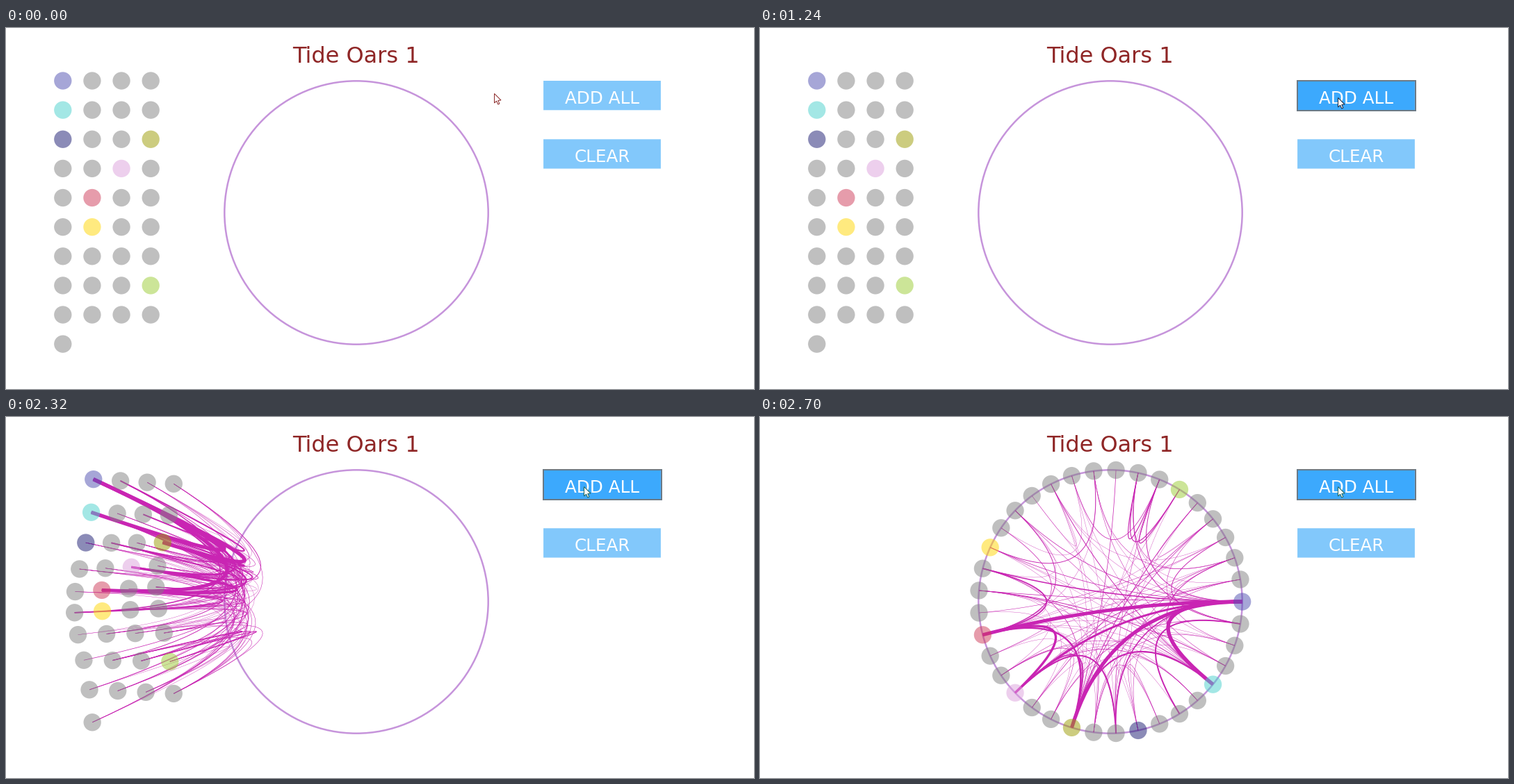
Recreate the animation shown at these times as a matplotlib script. Size 1076 px wide and 520 px high, loop 4030 ms.

```python
from itertools import combinations

import matplotlib.pyplot as plt
import numpy as np
from matplotlib.animation import FuncAnimation
from matplotlib.collections import LineCollection
from matplotlib.patches import Circle, Polygon, Rectangle

W, H, DPI = 1076, 520, 100
LOOP, TICK = 4030, 10
PX = 72 / DPI  # points per pixel

CENTER = np.array([504, 266])
RADIUS, GAP, COUNT = 189.7, 42.13, 37
COLORS = {0: "#4f4fb1", 4: "#48d1cc", 8: "#191970", 11: "#9a9a00",
          14: "#dda0dd", 17: "#ce3b59", 21: "#ffd700", 31: "#9acd32"}
LINK = "#c925b3"

# The screen refreshes 13 times a second; these count refreshes.
HOVER, REST, PRESS, RELEASE = 10, 16, 24, 27

# Strongest links of the main nodes; the others are drawn at random.
MAIN = {0: {4: 26, 11: 25, 17: 24, 14: 14, 20: 7},
        17: {14: 16, 11: 11, 20: 8},
        11: {4: 10, 14: 8},
        9: {14: 9, 0: 7},
        6: {1: 9}}
LEADS = (0, 4, 9, 11, 14, 17)


def build_links():
    rng = np.random.default_rng(4)
    links = {}
    for i in range(COUNT):
        partners = [k for k in LEADS if rng.random() < 0.3]
        partners += list(rng.integers(0, COUNT, 1 + i % 2))
        for k in partners:
            if k != i:
                links[min(i, k), max(i, k)] = min(rng.geometric(0.55), 4)
    for a, b in combinations((29, 30, 31), 2):
        links[a, b] = 5
    for a, others in MAIN.items():
        for b, strength in others.items():
            links[min(a, b), max(a, b)] = strength
    return links


def ease(u):
    """Cubic in and out."""
    u = np.clip(u, 0, 1)
    return np.where(u < 0.5, 4 * u ** 3, 1 - 4 * (1 - u) ** 3)


index = np.arange(COUNT)
grid = np.column_stack([81.8 + GAP * (index % 4), 76 + GAP * (index // 4)])
angle = 2 * np.pi * index / COUNT
ring = CENTER + RADIUS * np.column_stack([np.cos(angle), np.sin(angle)])

links = build_links()
ends = np.array(list(links))
widths = (0.15 + 0.2 * np.array(list(links.values()))) * PX
t = np.linspace(0, 1, 28)[None, :, None]


def positions(step):
    """Nodes on their way from grid to ring, later ones a touch behind."""
    u = np.interp(step, [28.26, 32, 33.3], [0, 0.563, 1])
    lag = 8e-5 * index * (u < 1)
    return grid + (ring - grid) * ease(u - lag)[:, None]


def curves(pos):
    """Quadratic curves pulled towards the middle of the ring."""
    a, b = pos[ends[:, 0], None], pos[ends[:, 1], None]
    return (1 - t) ** 2 * a + 2 * t * (1 - t) * CENTER + t ** 2 * b


def cursor_tip(step):
    x = np.interp(step, [5, 6, 8, 10, 12, 16], [702, 712, 712, 776, 811, 831])
    y = np.interp(step, [5, 16], [94, 100])
    return np.array([x, y])


def cursor_edge(step):
    if step < HOVER:
        return "#8b2a2a"
    if step < REST:
        return "#7f9440"
    return "#16243c" if step < PRESS else "#1f6458"


fig = plt.figure(figsize=(W / DPI, H / DPI), dpi=DPI, facecolor="white")
ax = fig.add_axes([0, 0, 1, 1])
ax.set_xlim(0, W)
ax.set_ylim(H, 0)
ax.axis("off")


def label(x, y, text, size, color):
    ax.text(x, y, text, fontsize=size * PX, color=color, ha="center",
            va="baseline", family="DejaVu Sans", zorder=5)


def button(y, text):
    box = Rectangle((773.1, y), 168.8, 42.3, fc="#82c8fb", ec="none",
                    snap=False, zorder=4)
    ax.add_patch(box)
    label(858, y + 33, text, 24.6, "white")
    return box


label(503, 50, "Tide Oars 1", 32, "#8f2626")
add_all = button(76, "ADD ALL")
button(76 + 2 * GAP, "CLEAR")
outline = Rectangle((773, 76), 170, 43, fc="none", ec="#6c7a86", zorder=4)
ax.add_patch(outline)

ax.add_patch(Circle(CENTER, RADIUS, fc="none", ec="#c694db", lw=2.5 * PX,
                    zorder=1))
lines = LineCollection(curves(grid), colors=LINK, linewidths=widths, zorder=2)
ax.add_collection(lines, autolim=False)
nodes = ax.scatter(*grid.T, s=(25.3 * PX) ** 2, linewidths=0, alpha=0.5,
                   c=[COLORS.get(i, "#808080") for i in index], zorder=3)

ARROW = np.array([(0.5, 0.5), (0.5, 14), (3.6, 11.2), (5.8, 16), (7.9, 15),
                  (5.8, 10.4), (10, 10)])
cursor = Polygon(ARROW, fc="white", lw=PX, zorder=6)
ax.add_patch(cursor)


def draw(n):
    step = max(0, (n * TICK - 4) * 13 // 1000)

    cursor.set_xy(ARROW + cursor_tip(step))
    cursor.set_edgecolor(cursor_edge(step))

    hover = step >= HOVER
    add_all.set_facecolor("#3ca9fd" if hover else "#82c8fb")
    outline.set_visible(hover)
    outline.set_linewidth((3 if PRESS <= step < RELEASE else 2) * PX)

    pos = positions(step)
    nodes.set_offsets(pos)
    lines.set_segments(curves(pos))
    lines.set_visible(step >= RELEASE)
    return nodes, lines, cursor, add_all, outline


anim = FuncAnimation(fig, draw, frames=LOOP // TICK, interval=TICK,
                     repeat=True, repeat_delay=0, blit=False)
plt.show()
```
